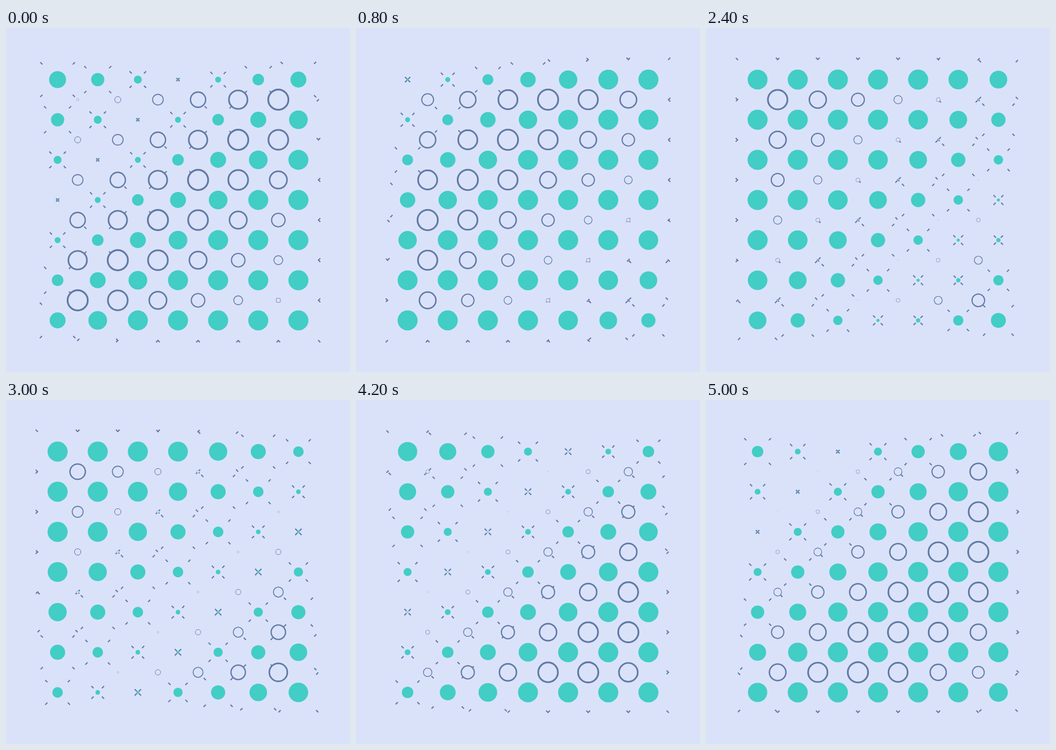
Write an HTML page with a canvas that moves like this. It is 600 px wide and 600 px high and loops after 5.2 s.

```html
<!DOCTYPE html>
<html lang="en">
<head>
<meta charset="utf-8">
<title>Dot wave</title>
<style>
  html, body { margin: 0; width: 100%; height: 100%; overflow: hidden; background: #dae2fa; }
  canvas { display: block; width: 100vw; height: 100vh; }
</style>
</head>
<body>
<canvas id="stage" width="600" height="600"></canvas>
<script>
const ctx = document.getElementById('stage').getContext('2d');
const BG = '#dae2fa', DOT = '#42cdc5', LINE = '#617aa3';
const LOOP = 5200, STEP = 200, CELL = 70;
const DOT_PERIOD = 14.1, DOT_REACH = 5.2;
const RING_PERIOD = 13.73, RING_SPEED = 0.783, RING_START = 5.3;

// [time in ms, diagonal on which the dots vanish]
const WAVE = [[0, 17.26], [800, 14.4], [1600, 11.72], [2400, 9.42],
              [3400, 6.42], [4200, 4.18], [5000, 1.82]];

function waveAt(time) {
  const i = Math.max(1, WAVE.findIndex(([t]) => t >= time));
  const [t0, a] = WAVE[i - 1], [t1, b] = WAVE[i];
  return a + (b - a) * (time - t0) / (t1 - t0);
}

// Signed dot scale: swings between 1 and -1, easing out of each zero crossing.
function dotScale(diagonal, wave) {
  const turn = Math.round((diagonal - wave) / DOT_PERIOD);
  const x = diagonal - wave - turn * DOT_PERIOD;
  const rest = Math.max(0, 1 - Math.abs(x) / DOT_REACH);
  return (turn % 2 ? 1 : -1) * Math.sign(x) * (1 - rest * rest);
}

function ringScale(diagonal, peak) {
  return Math.cos(Math.PI * (diagonal - peak) / RING_PERIOD) ** 2;
}

function eachCell(count, origin, draw) {
  for (let row = 0; row < count; row++)
    for (let col = 0; col < count; col++)
      draw(origin + col * CELL, origin + row * CELL, row + col);
}

function circle(x, y, radius) {
  ctx.beginPath();
  ctx.arc(x, y, radius, 0, 2 * Math.PI);
}

function drawTicks(x, y, scale) {
  const from = 35 * scale - 0.6, to = from + 3.8;
  ctx.lineWidth = 2;
  ctx.strokeStyle = LINE;
  ctx.beginPath();
  for (const sx of [-1, 1])
    for (const sy of [-1, 1]) {
      ctx.moveTo(x + sx * from, y + sy * from);
      ctx.lineTo(x + sx * to, y + sy * to);
    }
  ctx.stroke();
}

function drawDot(x, y, scale) {
  circle(x, y, 17.5 * Math.abs(scale));
  ctx.fillStyle = DOT;
  ctx.fill();
}

function drawRing(x, y, scale) {
  if (scale < 0.01) return;
  circle(x, y, 17.7 * scale);
  ctx.fillStyle = BG;
  ctx.fill();
  ctx.lineWidth = 3.1 * scale;
  ctx.strokeStyle = LINE;
  ctx.stroke();
}

function render(time) {
  const wave = waveAt(time);
  const peak = RING_START - RING_SPEED * (WAVE[0][1] - wave);
  ctx.fillStyle = BG;
  ctx.fillRect(0, 0, 600, 600);
  eachCell(7, 90, (x, y, d) => drawTicks(x, y, dotScale(d, wave)));
  eachCell(7, 90, (x, y, d) => drawDot(x, y, dotScale(d, wave)));
  eachCell(6, 125, (x, y, d) => drawRing(x, y, ringScale(d, peak)));
}

const start = performance.now();
function tick() {
  const time = (performance.now() - start) % LOOP;
  render(Math.floor(time / STEP) * STEP);
  requestAnimationFrame(tick);
}
tick();
</script>
</body>
</html>
```
